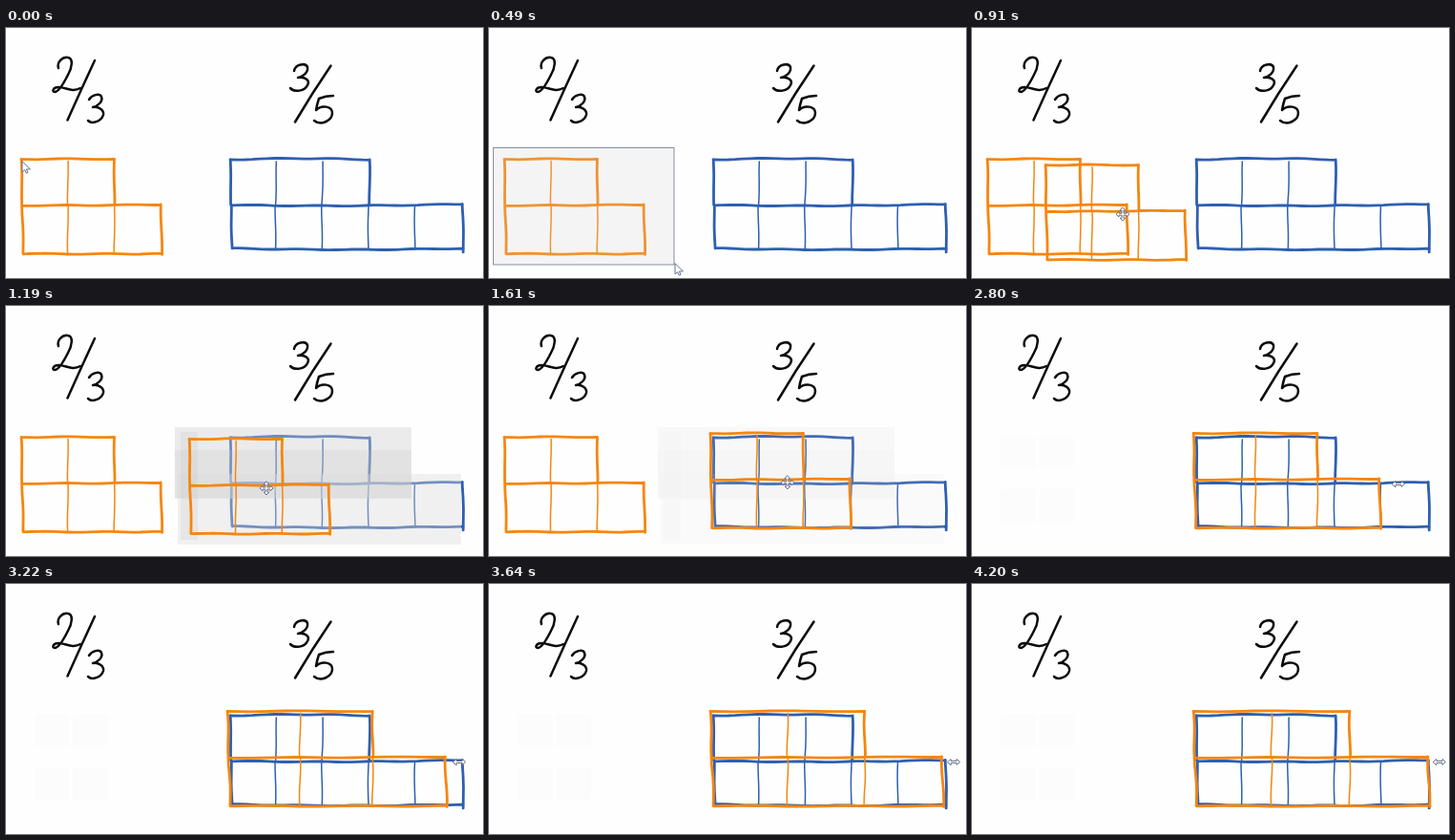
These frames come from a looping animation (500 px wide and 262 px high, 4.27 s). An HTML page:

```html
<!DOCTYPE html>
<html lang="en">
<head>
<meta charset="utf-8">
<title>Comparing fractions</title>
<style>
html, body { margin: 0; width: 100%; height: 100%; overflow: hidden; background: #fefefe; }
svg { display: block; width: 100vw; height: 100vh; }
path { fill: none; stroke-linecap: round; stroke-linejoin: round; }
.digits { stroke: #0b0b0b; stroke-width: 2.5; }
.blue { stroke: #2e5fb1; }
.orange { stroke: #f5860f; }
.thick { stroke-width: 2.8; }
.thin { stroke-width: 1.5; }
.halo .thick { stroke: #cfcfcf; stroke-width: 8; }
.halo .thin { stroke: #dedede; stroke-width: 6; }
.cursor path { fill: #fff; stroke: #68708a; }
</style>
</head>
<body>
<svg viewBox="0 0 500 262" preserveAspectRatio="none">
  <rect width="500" height="262" fill="#fefefe"/>
  <g id="residue" fill="#fcfcfc"></g>
  <g class="digits">
    <path d="M55 42C53 36 59 30 65 31C71 32 69 42 65 49C61 57 55 67 51 67C48 67 49 62 55 62C63 62 69 68 78 63"/>
    <path d="M93 34Q79 64 64.500 96.500"/>
    <path d="M87 75C90 70 98 68 100 72C102 77 96 82 91 83C97 82 103 86 102 91C100 98 90 101 86 97"/>
    <path d="M302 45C303 38 314 36 316 41C317 47 311 51 306 52C314 51 319 55 316 60C313 66 303 68 298 63"/>
    <path d="M340.500 39.500Q321 68 303 98.500"/>
    <path d="M343 71Q335 71 328 74Q326 80 325 86C331 80 342 82 342 89C342 97 330 103 323 97"/>
  </g>
  <g id="blue" class="blue"></g>
  <g id="trail">
    <rect x="177" y="127" width="248" height="75" fill="#cdcdcd" opacity=".4"/>
    <rect x="177" y="151" width="248" height="50" fill="#bebebe" opacity=".2"/>
    <rect x="180" y="176" width="297" height="74" fill="#dadada" opacity=".4"/>
    <rect x="183" y="132" width="18" height="113" fill="#bebebe" opacity=".2"/>
  </g>
  <g id="home" class="orange"></g>
  <g id="halo" class="halo"></g>
  <g id="copy" class="orange"></g>
  <rect id="lasso" x="4.500" y="125.500" fill="rgba(205,205,205,.2)" stroke="#858da3"/>
  <g id="frame"></g>
  <g class="cursor">
    <path id="arrow" d="M0 0V11L2.600 8.700L4.300 12.200L6 11.400L4.400 8H8Z"/>
    <path id="move" d="M0-7L2.800-4H1V-1H4V-2.800L7 0L4 2.800V1H1V4H2.800L0 7L-2.800 4H-1V1H-4V2.800L-7 0L-4-2.800V-1H-1V-4H-2.800Z"/>
    <path id="resize" d="M-6.500 0L-3-3V-1H3V-3L6.500 0L3 3V1H-3V3Z"/>
  </g>
</svg>
<script>
const LOOP = 4270, STEP = 70;
const RELEASE = 630, GRAB = 820, DROP = 1820, STRETCH = 2450, END = 4200;
const $ = id => document.getElementById(id);

const ramp = (t, a, b) => Math.min(1, Math.max(0, (t - a) / (b - a)));
const easeOut = p => 1 - (1 - p) ** 3;
const mix = (a, b, p) => a.map((v, i) => v + (b[i] - v) * p);
const still = (x, y) => [x, y];

function seeded(seed) {
  return () => (seed = seed * 16807 % 2147483647) / 2147483647;
}

// A hand-drawn line between two points: a gentle bow plus a small tremor.
function penLine(a, b, bow, random) {
  const len = Math.hypot(b[0] - a[0], b[1] - a[1]);
  const nx = (a[1] - b[1]) / len, ny = (b[0] - a[0]) / len;
  const phase = random() * 6.28, n = Math.ceil(len / 8);
  return Array.from({ length: n + 1 }, (_, i) => {
    const p = i / n;
    const off = bow * Math.sin(Math.PI * p) + 0.4 * Math.sin(p * len / 10 + phase);
    const [x, y] = mix(a, b, p);
    return [x + nx * off, y + ny * off];
  });
}

// Two stacked rows of square cells; the lower row is longer.
function makeBars({ x, cell, rows, cols, bow, slant, seed }) {
  const random = seeded(seed);
  const [top, mid, bottom] = rows, [short, long] = cols;
  const line = (x1, y1, x2, y2, b = 0) => penLine([x1, y1], [x2, y2], b, random);
  const right = n => x + n * cell;
  const thick = [
    line(x, top, right(short), top, -bow),
    line(x + 1, mid, right(long), mid - 1, bow),
    line(x + 2, bottom, right(long) + 1, bottom, bow),
    line(x, top, x + 1, mid),
    line(x + 1, mid, x + 2, bottom),
    line(right(short), top, right(short), mid),
    line(right(long), mid - 1, right(long) + 1, bottom + bow * 3)
  ];
  const thin = [];
  for (let n = 1; n < long; n++) {
    if (n < short) thin.push(line(right(n), top + 2, right(n) + slant, mid));
    thin.push(line(right(n) + slant, mid + 1, right(n) + slant, bottom));
  }
  return { thick, thin };
}

const orangeBars = makeBars({
  x: 16, cell: 48.8, rows: [137.5, 186, 236.5], cols: [2, 3], bow: 0.3, slant: 0, seed: 23
});
const blueBars = makeBars({
  x: 235, cell: 48.7, rows: [138, 185.5, 231], cols: [3, 5], bow: 1.3, slant: -1.3, seed: 71
});

function drawBars(id, bars, place = still) {
  $(id).innerHTML = Object.entries(bars).map(([kind, lines]) => {
    const d = lines.map(pts => "M" + pts.map(([x, y]) =>
      place(x, y).map(v => v.toFixed(1)).join(" ")).join("L")).join("");
    return `<path class="${kind}" d="${d}"/>`;
  }).join("");
}

const rect = (x, y, w, h, extra) =>
  `<rect x="${x}" y="${y}" width="${w}" height="${h}" ${extra}/>`;

function selectionFrame(x, y) {
  const w = 161, h = 112;
  let s = rect(x, y, w, h, 'fill="none" stroke="#777" stroke-dasharray="3 2"');
  for (const i of [0, 0.5, 1]) for (const j of [0, 0.5, 1]) {
    if (i === 0.5 && j === 0.5) continue;
    s += rect(x + i * w - 2, y + j * h - 2, 4, 4, 'fill="#fff" stroke="#999" stroke-width=".8"');
  }
  return s;
}

const show = (id, on) => $(id).setAttribute("display", on ? "inline" : "none");

function pointerAt(t, dx, dy, grown) {
  let p = mix([17, 140], [4, 125], ramp(t, 0, 140));
  p = mix(p, [195, 247], ramp(t, 140, 490));
  p = mix(p, [97, 189], ramp(t, 560, GRAB));
  p = [p[0] + dx, p[1] + dy];
  p = mix(p, [308, 184], ramp(t, 1680, DROP));
  return mix(p, [406 + 84 * grown, 186.5], ramp(t, 2240, STRETCH));
}

function draw(t) {
  const carried = easeOut(ramp(t, GRAB, 1680));
  const grown = easeOut(ramp(t, STRETCH, END));
  const dx = 216 * carried;
  const dy = 9.5 * Math.sin(Math.PI * carried) - 4 * carried;
  const stretch = 1 + 0.68 * grown;
  const place = (x, y) => [16 + dx + (x - 16) * stretch, y + dy];
  const picked = t >= RELEASE && t < GRAB || t >= DROP && t < STRETCH;
  const [px, py] = pointerAt(t, dx, dy, grown);

  show("home", t < DROP);
  show("residue", t >= DROP);
  show("copy", t >= RELEASE);
  show("halo", picked);
  show("frame", picked);
  show("trail", t >= 980 && t < 1750);
  $("trail").setAttribute("opacity", 1 - ramp(t, 1260, 1750));

  drawBars("copy", orangeBars, place);
  if (picked) {
    drawBars("halo", orangeBars, place);
    $("frame").innerHTML = selectionFrame(8.5 + dx, 131 + dy);
  }

  show("lasso", t > 140 && t < RELEASE);
  $("lasso").setAttribute("width", Math.max(0, px - 5.5));
  $("lasso").setAttribute("height", Math.max(0, py - 124.5));

  const pointer = t < 770 ? "arrow" : t < 2380 ? "move" : "resize";
  for (const id of ["arrow", "move", "resize"]) show(id, id === pointer);
  $(pointer).setAttribute("transform", `translate(${px.toFixed(1)} ${py.toFixed(1)})`);
}

drawBars("blue", blueBars);
drawBars("home", orangeBars);
for (const x of [30, 70]) for (const y of [136, 192])
  $("residue").innerHTML += rect(x, y, 37, 35, 'rx="4"');

const start = performance.now();
function tick() {
  const t = (performance.now() - start) % LOOP;
  draw(Math.floor(t / STEP) * STEP);
  requestAnimationFrame(tick);
}
draw(0);
requestAnimationFrame(tick);
</script>
</body>
</html>
```
